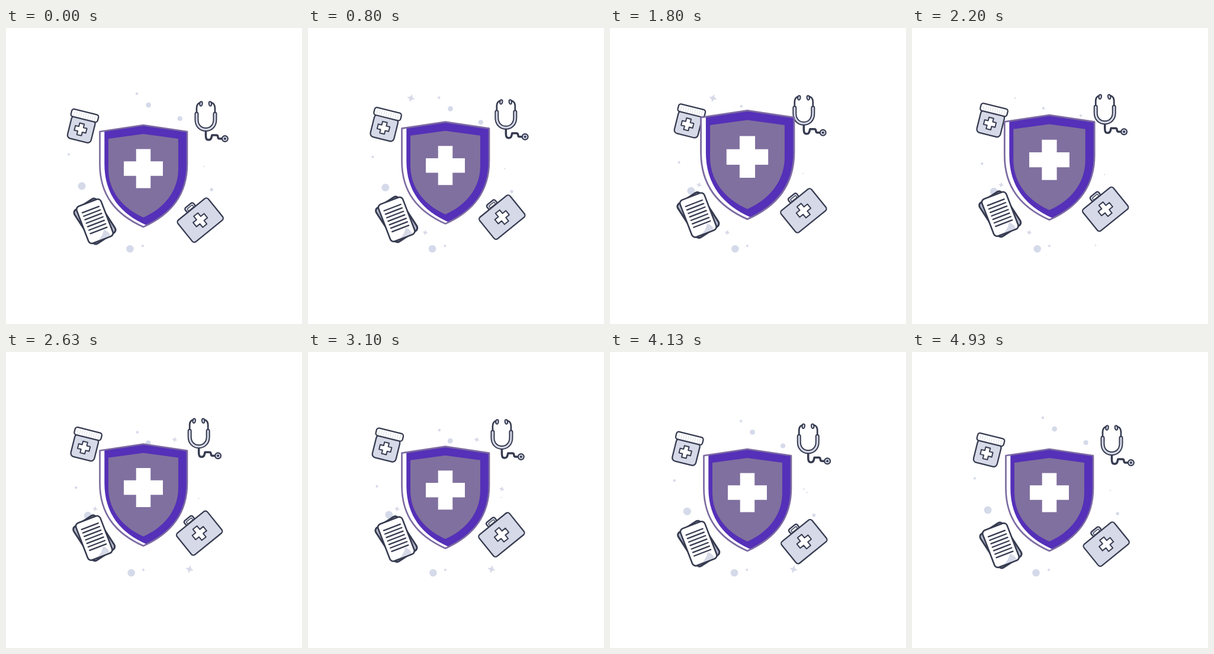
An HTML page with a canvas that plays this animation: 500 px wide and 500 px high, repeating every 5.01 s.

```html
<!DOCTYPE html>
<html lang="en">
<head>
<meta charset="utf-8">
<title>Health shield</title>
<style>
html, body { margin: 0; width: 100%; height: 100%; overflow: hidden; background: #fff; }
canvas { display: block; width: 500px; height: 500px; }
</style>
</head>
<body>
<canvas id="stage" width="500" height="500"></canvas>
<script>
const ctx = document.getElementById('stage').getContext('2d');
const LOOP = 5010;
const WHITE = '#fff', DARK = '#363b50', LIGHT = '#d6d9e7', DOT = '#d5daea';
const PURPLE = '#5530b8', LILAC = '#80709f', EDGE = '#7c6ba1';

// x, y, radius, drift x, drift y
const dots = [
  [221, 111, 2.2, 1, 25], [240.7, 130, 4.4, -0.5, 24], [293.7, 153, 4, -7, 24],
  [106, 213.5, 2.1, 12.5, 16], [128, 267, 6.5, 10.5, 9.5], [209.5, 373, 6.3, 2.2, 0],
  [231, 368, 2, 1, 0], [335, 234, 1.1, -10, 14], [347.2, 273, 2.7, -12, 12]
];

// x, y, radius, start, end
const sparkles = [
  [174, 118.5, 7, 250, 2350], [198, 345.5, 4.8, 350, 2700],
  [150.5, 265, 4.8, 1200, 3650], [285, 148, 4.8, 1950, 3750],
  [310, 367, 7, 2050, 4550], [327.5, 231.5, 4.8, 2550, 4330]
];

const clamp = v => Math.max(0, Math.min(1, v));
const ease = v => (1 - Math.cos(Math.PI * clamp(v))) / 2;

function paint(fill, stroke, width) {
  if (fill) { ctx.fillStyle = fill; ctx.fill(); }
  if (stroke) { ctx.strokeStyle = stroke; ctx.lineWidth = width; ctx.stroke(); }
}

function draw(d, fill, stroke, width) {
  const p = new Path2D(d);
  if (fill) { ctx.fillStyle = fill; ctx.fill(p); }
  if (stroke) { ctx.strokeStyle = stroke; ctx.lineWidth = width; ctx.stroke(p); }
}

function box(w, h, r, fill, stroke = DARK, width = 2.3) {
  ctx.beginPath();
  ctx.roundRect(-w / 2, -h / 2, w, h, r);
  paint(fill, stroke, width);
}

function circle(x, y, r, fill, stroke, width) {
  ctx.beginPath();
  ctx.arc(x, y, r, 0, 2 * Math.PI);
  paint(fill, stroke, width);
}

function cross(size, arm, stroke) {
  const s = size / 2, a = arm / 2, b = s - a;
  draw(`M${-a} ${-s}h${arm}v${b}h${b}v${arm}h${-b}v${b}h${-arm}v${-b}h${-b}v${-arm}h${b}z`, WHITE, stroke, 2);
}

function at(x, y, degrees, body) {
  ctx.save();
  ctx.translate(x, y);
  ctx.rotate(degrees * Math.PI / 180);
  body();
  ctx.restore();
}

function sparkle([x, y, radius, start, end], t) {
  const r = radius * ease((t - start) / 400) * ease((end - t) / 400);
  if (r < 0.1) return;
  at(x, y, 16, () => {
    ctx.beginPath();
    ctx.moveTo(0, -r);
    for (let i = 1; i <= 8; i++) {
      const a = i * Math.PI / 4, q = i % 2 ? r * 0.42 : r;
      ctx.lineTo(Math.sin(a) * q, -Math.cos(a) * q);
    }
    paint('#d8d9e8');
  });
}

function bottle() {
  at(0, 24, 0, () => box(41, 39, 6, LIGHT));
  at(-1.2, 24.2, 0, () => cross(20, 8, DARK));
  box(46.5, 13, 4, WHITE);
  for (let x = -18; x <= 18; x += 4) draw(`M${x} -3.5v8`, null, '#d3d6e1', 0.8);
}

function papers() {
  at(0, 0, -33, () => box(45, 68, 6, '#b5b9ca', DARK, 3));
  at(0, 0, -21, () => {
    box(44, 67, 6, WHITE, DARK, 2.6);
    draw('M-7 32Q3 29 9 19Q16 24 16 31Q14 32 11 32z', LIGHT);
    for (let i = 0; i < 7; i++) draw(`M-14.5 ${i * 6.3 - 21}h30`, null, DARK, 2.3);
  });
}

function medicalCase() {
  at(0, -27.5, 0, () => {
    box(18, 9, 3, LIGHT);
    at(0, 1, 0, () => box(11, 4, 1, WHITE, DARK, 1.3));
  });
  box(66, 47, 4.5, LIGHT);
  cross(24, 9, DARK);
}

function stethoscope() {
  draw('M328 126Q322 128 322 135V146M347 126Q353 128 353 135V146', null, DARK, 2.7);
  for (const x of [329.5, 345]) {
    ctx.beginPath();
    ctx.ellipse(x, 128, 2.2, 3.7, x < 337 ? 0.15 : -0.15, 0, 2 * Math.PI);
    paint(LIGHT, DARK, 2);
  }
  draw('M337.5 173V182Q337.5 189 342 189Q346 189 347 185L348 181H355Q358 181 358 184Q358 187 361 187H365', null, DARK, 3.5);
  const tube = 'M322 145V155C322 177 353 177 353 155V145';
  draw(tube, null, DARK, 7);
  draw(tube, null, LIGHT, 3);
  circle(369.9, 187, 4.9, LIGHT, DARK, 2.2);
  circle(369.9, 187, 2, DARK);
}

function shield(t) {
  const lift = 13 * (t < 1800 ? ease(t / 1800) : ease((3930 - t) / 2130));
  const pulse = ease((t - 1150) / 650) * ease((2500 - t) / 650);
  const scale = 1 + 0.067 * pulse;
  ctx.save();
  ctx.translate(232, 337 - lift);
  ctx.scale(scale, scale);
  ctx.translate(-232, -337);
  const outline = 'M232 164L306 175V230C306 282 279 315 232 336C185 315 158.5 282 158.5 230V175z';
  draw(outline, WHITE);
  draw('M232 164L306 175V230C306 282 279 315 237 333C194 314 166.3 282 166.3 230V174z', PURPLE);
  draw(outline, null, EDGE, 2.7);
  draw('M232 179L291 187V238C291 278 264 306 232 320C200 306 173 278 173 238V187z', LILAC);
  ctx.translate(232, 237.5);
  cross(66, 24.5);
  ctx.restore();
}

function render(t) {
  const k = (1 + Math.cos(2 * Math.PI * (t - 2440) / 5000)) / 2;
  ctx.fillStyle = WHITE;
  ctx.fillRect(0, 0, 500, 500);
  ctx.lineJoin = ctx.lineCap = 'round';
  for (const [x, y, r, dx, dy] of dots) circle(x + dx * k, y + dy * k, r, DOT);
  for (const s of sparkles) sparkle(s, t);
  at(133 + 5.7 * k, 148 - 10 * k, 14, bottle);
  at(150 - 1.3 * k, 326.5 - 12.5 * k, 0, papers);
  at(328.2 - 1.5 * k, 324.6 - 19 * k, -39, medicalCase);
  at(-12 * k, -12 * k, 0, stethoscope);
  shield(t);
}

// The picture advances in 50 ms poses held alternately for 30 and 70 ms.
function tick() {
  const t = performance.now() % LOOP;
  const pose = Math.min(99, 2 * Math.floor(t / 100) + (t % 100 >= 30 ? 1 : 0));
  render(pose * 50);
  requestAnimationFrame(tick);
}
tick();
</script>
</body>
</html>
```
